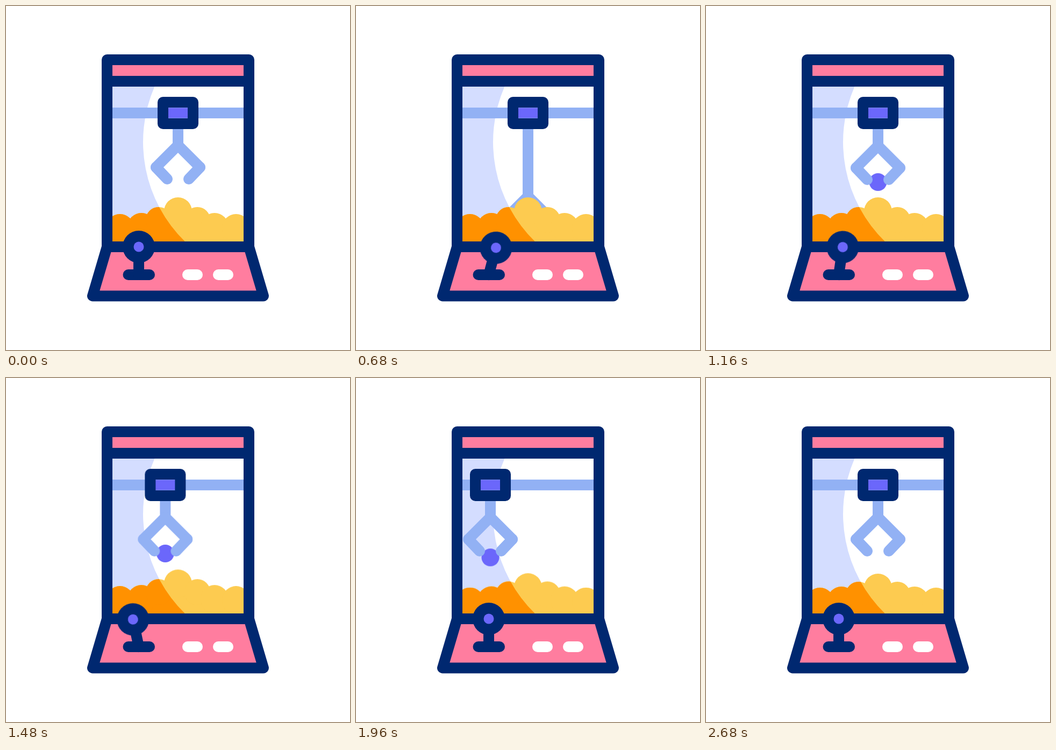
Animation of 640 by 640 pixels, one loop 3 s. Source, as an HTML page:

```html
<!DOCTYPE html>
<html lang="en">
<head>
<meta charset="utf-8">
<title>Claw machine</title>
<style>
  html, body { margin: 0; height: 100%; overflow: hidden; background: #fff; }
  svg { display: block; width: 100vw; height: 100vh; }

  .navy { fill: none; stroke: #002870; stroke-width: 20; stroke-linejoin: round; stroke-linecap: round; }
  .steel { fill: none; stroke: #92b1f4; stroke-width: 20; stroke-linecap: round; stroke-linejoin: round; }
  .violet { fill: #6b67fb; }
  .pink { fill: #ff7d9f; }

  .trolley, .claw, .upper, .fore, .ball, .stick, .pile circle {
    animation: 3s cubic-bezier(.333, 0, .667, 1) infinite;
  }
  .trolley { animation-name: slide; }
  .claw { animation-name: dip; }
  .upper { animation-name: spread; }
  .fore { animation-name: unbend; transform-origin: 41px 41px; }
  .ball { animation-name: carry; }
  .stick { animation-name: tilt; transform-origin: 247px 500px; }
  .pile circle { animation-name: press; }

  @keyframes slide {
    0%, 44.17% { transform: translateX(0); }
    57.5%, 68.67% { transform: translateX(-70px); }
    83.33%, 100% { transform: translateX(0); }
  }
  @keyframes dip {
    0%, 6.67% { transform: translateY(0); }
    21.33%, 26.67% { transform: translateY(95px); }
    39.5%, 100% { transform: translateY(0); }
  }
  @keyframes spread {
    0%, 62.67% { transform: rotate(0deg); }
    68%, 76% { transform: rotate(-3.5deg); }
    84%, 100% { transform: rotate(0deg); }
  }
  @keyframes unbend {
    0%, 62.67% { transform: rotate(0deg); }
    68%, 76% { transform: rotate(-7deg); }
    84%, 100% { transform: rotate(0deg); }
  }
  /* lifted, carried left, dropped, then reset out of sight behind the pile */
  @keyframes carry {
    0%, 26.67% { transform: translate(0, 95px); }
    39.5%, 44.17% { transform: translate(0, 0); }
    57.5% { transform: translate(-70px, 0); }
    63.33% { transform: translate(-70px, 0); animation-timing-function: cubic-bezier(.333, 0, .667, .333); }
    70.67% { transform: translate(-70px, 95px); animation-timing-function: step-end; }
    72%, 100% { transform: translate(0, 95px); }
  }
  @keyframes tilt {
    0%, 2.67% { transform: rotate(0deg); }
    22.67%, 32% { transform: rotate(15deg); }
    53.67%, 54.67% { transform: rotate(-15deg); }
    64.67%, 76% { transform: rotate(0deg); }
    82.67% { transform: rotate(-15deg); }
    89.33%, 100% { transform: rotate(0deg); }
  }
  @keyframes press {
    0%, 13.33% { transform: translateY(0); }
    22.33%, 26.67% { transform: translateY(var(--sink)); }
    36.67%, 100% { transform: translateY(0); }
  }
  .s3 { --sink: 3px; }
  .s5 { --sink: 5px; }
  .s8 { --sink: 8px; }
</style>
</head>
<body>
<svg viewBox="0 0 640 640">
  <defs>
    <path id="shade" d="M190 150H276.4A259 259 0 0 0 332.7 438V445H190Z"/>
    <clipPath id="left"><use href="#shade"/></clipPath>
    <clipPath id="below"><rect x="200" y="200" width="240" height="260"/></clipPath>
    <clipPath id="glass"><rect x="190" y="145" width="260" height="300"/></clipPath>
    <g id="pile" class="pile">
      <rect x="190" y="402" width="260" height="43"/>
      <circle class="s3" cx="212" cy="413" r="26"/>
      <circle class="s3" cx="252" cy="411" r="26"/>
      <circle class="s5" cx="284" cy="398" r="24"/>
      <circle class="s8" cx="320" cy="382" r="26"/>
      <circle class="s5" cx="356" cy="398" r="24"/>
      <circle class="s3" cx="388" cy="411" r="26"/>
      <circle class="s3" cx="428" cy="413" r="26"/>
    </g>
    <g id="arm" class="steel">
      <g class="upper">
        <path d="M0 0L41 41"/>
        <path class="fore" d="M41 41L20 63"/>
      </g>
    </g>
  </defs>

  <g clip-path="url(#glass)">
    <use href="#shade" fill="#d4ddff"/>
    <path class="steel" d="M190 199H450"/>
    <circle class="ball violet" cx="320" cy="326.5" r="16.5"/>
    <g class="trolley">
      <g clip-path="url(#below)" style="clip-path: polygon(0 0)" display="none"></g>
      <g style="clip-path: none">
        <svg x="220" y="200" width="200" height="260" viewBox="220 200 200 260" style="width: 200px; height: 260px">
          <g class="claw">
            <g transform="translate(320 259)">
              <path class="steel" d="M0 0V-140"/>
              <use href="#arm"/>
              <use href="#arm" transform="scale(-1 1)"/>
            </g>
          </g>
        </svg>
      </g>
      <rect class="navy" x="292" y="179" width="56" height="40"/>
      <rect class="violet" x="302" y="189.500" width="36" height="19"/>
    </g>
    <use href="#pile" fill="#fdcb50"/>
    <g clip-path="url(#left)"><use href="#pile" fill="#ff9100"/></g>
  </g>

  <path class="pink" d="M188 100H452V140H188ZM188 448H452L479 540H161Z"/>
  <path class="navy" d="M188 100H452V448H188ZM188 140H452M188 448L161 539.500H479L452 448"/>

  <path class="navy" d="M227.500 500H267"/>
  <g class="stick">
    <path class="navy" d="M247 500V448"/>
    <circle cx="247" cy="448" r="30" fill="#002870"/>
    <circle class="violet" cx="247" cy="448" r="9.500"/>
  </g>

  <g fill="#fff">
    <rect x="328" y="490" width="38" height="20" rx="10"/>
    <rect x="385" y="490" width="38" height="20" rx="10"/>
  </g>
</svg>
</body>
</html>
```
